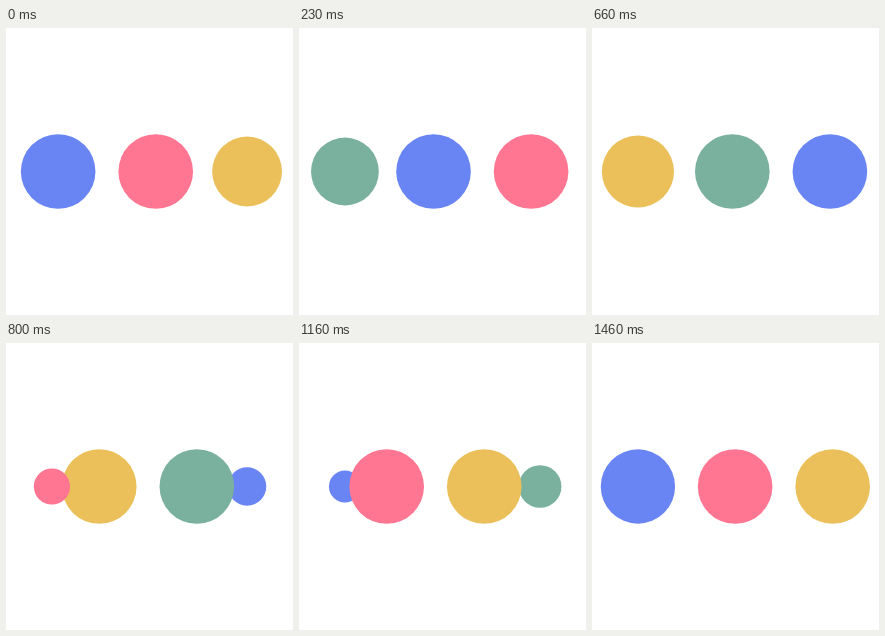
An HTML page for the animation above (1490 ms loop, 287 by 287 pixels).

```html
<!DOCTYPE html>
<html lang="en">
<head>
<meta charset="utf-8">
<title>Loading dots</title>
<style>
  html, body { margin: 0; height: 100%; overflow: hidden; background: #fff; }
  svg { display: block; width: 100vw; height: 100vh; }
</style>
</head>
<body>
<svg viewBox="0 0 100 100"></svg>
<script>
const LOOP = 1490, RADIUS = 13, LEFT = 16, GAP = 34;
const COLORS = ['#ebc05b', '#79b19e', '#6984f3', '#ff7693'];
const svg = document.querySelector('svg');

function addDot(color) {
  const dot = document.createElementNS('http://www.w3.org/2000/svg', 'circle');
  dot.setAttribute('cy', 50);
  dot.setAttribute('fill', color);
  return svg.appendChild(dot);
}

function place(dot, x, r) {
  dot.setAttribute('cx', x);
  dot.setAttribute('r', r);
}

// cubic-bezier(0, 0.5, 0.5, 1)
function ease(x) {
  let low = 0, high = 1;
  for (let i = 0; i < 30; i++) {
    const s = (low + high) / 2;
    if (1.5 * s * s - 0.5 * s ** 3 < x) low = s; else high = s;
  }
  return 1.5 * low - 0.5 * low ** 3;
}

const leaving = addDot(COLORS[0]);
const dots = COLORS.map(addDot);

function draw(now) {
  const time = (now % LOOP) / LOOP * 4;
  const step = Math.floor(time);
  const p = ease(time - step);

  leaving.setAttribute('fill', COLORS[(4 - step) % 4]);
  place(leaving, LEFT + 2 * GAP, RADIUS * (1 - p));

  // Phases: hidden, growing, left to middle, middle to right
  dots.forEach((dot, i) => {
    const phase = (i + step) % 4;
    const x = LEFT + GAP * Math.max(0, phase - 2 + p);
    place(dot, phase < 2 ? LEFT : x, RADIUS * [0, p, 1, 1][phase]);
  });
}

const start = performance.now();
function tick() {
  draw(performance.now() - start);
  requestAnimationFrame(tick);
}
tick();
</script>
</body>
</html>
```
